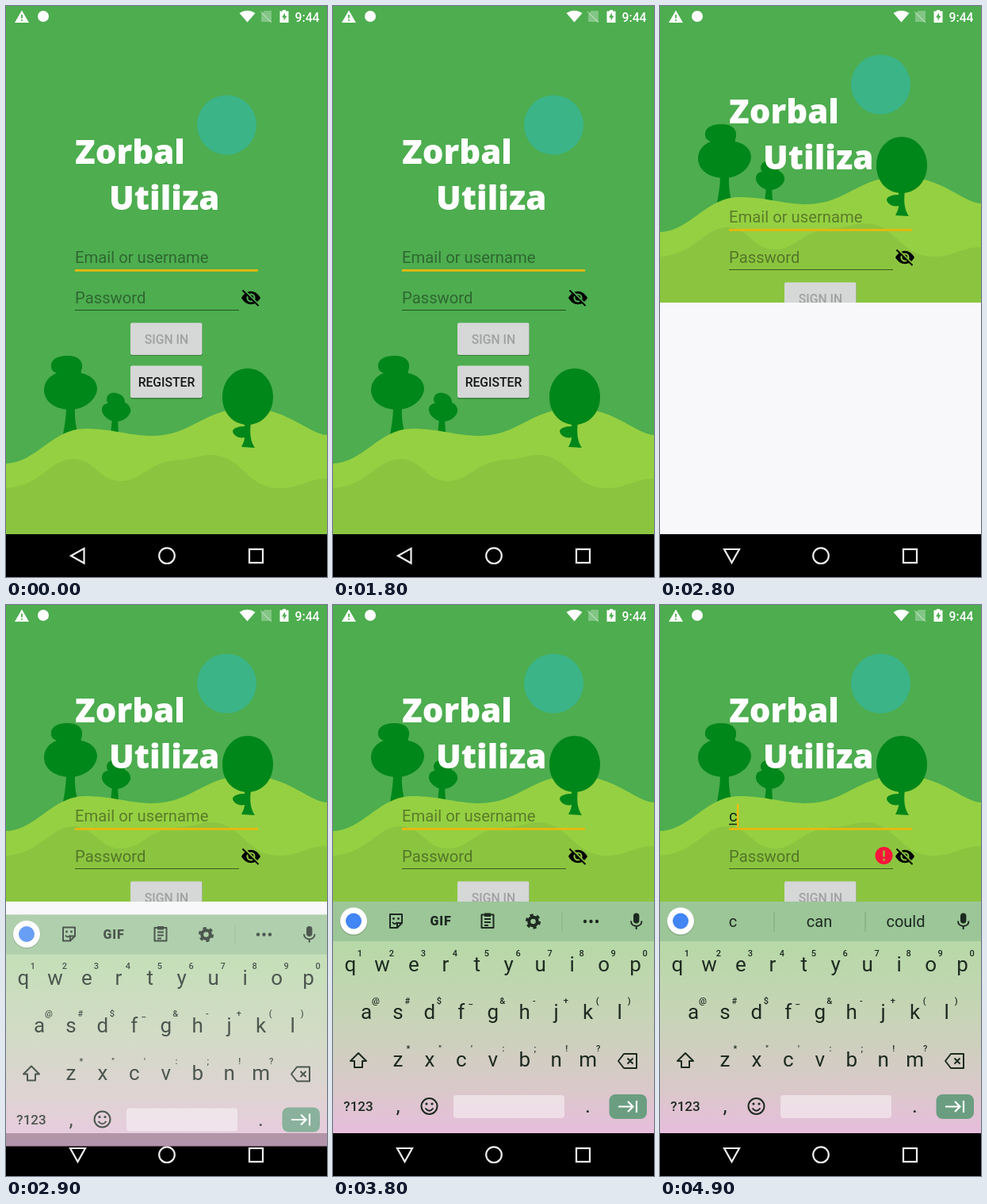
An HTML page that plays this animation: 405x720 px, repeating every 5200 ms.

```html
<!DOCTYPE html>
<html lang="en">
<head>
<meta charset="utf-8">
<title>Sign in</title>
<style>
  html, body { margin: 0; width: 100%; height: 100%; overflow: hidden; background: #000; }
  svg { display: block; width: 100%; height: 100%; }
  text { font-family: Roboto, sans-serif; white-space: pre; }
  .mid { text-anchor: middle; }
  .title { font: 800 42px "Open Sans", sans-serif; fill: #fff; }
  .field { font-size: 20.25px; }
  .hint { fill: rgba(0, 0, 0, .4); }
  .button { font-size: 15.75px; font-weight: 500; }
  .key { font-size: 26px; }
  .symbol { font-size: 11px; font-weight: 500; }
  .word { font-size: 20px; }
  .line { fill: none; stroke: #1d2a20; stroke-width: 2; stroke-linejoin: round; }
  .nav { fill: none; stroke: #eee; stroke-width: 2.2; }
</style>
</head>
<body>
<svg viewBox="0 0 405 720">
  <defs>
    <linearGradient id="keys" x1="0" y1="0" x2="0" y2="1">
      <stop offset="0" stop-color="#aedb9e"/>
      <stop offset=".5" stop-color="#c7d4b7"/>
      <stop offset=".8" stop-color="#d9c9c9"/>
      <stop offset="1" stop-color="#e7bddc"/>
    </linearGradient>
    <mask id="eyeCuts">
      <path fill="#fff" d="M290 350H330V390H290Z"/>
      <circle cx="309" cy="368" r="4.5" fill="none" stroke="#000" stroke-width="2.2"/>
      <path d="M299 356.5L322 379.5" stroke="#000" stroke-width="2.2"/>
    </mask>
  </defs>

  <rect width="405" height="720" fill="#4dad4f"/>

  <g id="scenery">
    <g fill="#008719">
      <path d="M57 455C56 443 70 441 78 441C90 441 97 447 96 455C96 459 94 461 95 463C106 465 115 472 115 483C114 497 98 509 81 509C64 509 48 500 48 484C48 474 55 466 64 463C59 461 57 458 57 455Z"/>
      <path d="M76 505H87Q86 525 91 540H72Q76 520 76 505Z"/>
      <path d="M127 495C128 488 135 487 139 488C146 490 150 493 150 500C155 502 158 507 157 512C154 520 146 524 139 524C130 524 120 516 121 508C122 503 125 501 129 501C127 499 127 497 127 495Z"/>
      <path d="M134 520H141L142 540H132Z"/>
    </g>
    <path fill="#95d042" d="M0 577C38 576 58 533 100 533C135 533 155 542 185 542C235 542 250 507 305 507C355 507 382 540 405 541V666H0Z"/>
    <path fill="#8bc540" d="M0 608C45 605 55 571 85 571C112 571 117 599 145 599C172 599 180 573 220 572C235 572 245 566 258 566C298 566 303 608 345 608C370 608 380 596 405 596V666H0Z"/>
    <g fill="#008719">
      <path d="M305 457C323 457 337 473 337 493C337 514 322 528 305 528C287 528 273 514 273 493C273 473 287 457 305 457Z"/>
      <path d="M301 525H309C307 540 309 550 314 557L297 556C299 552 301 548 301 544C294 546 286 541 286 536C287 531 296 530 301 530Z"/>
    </g>
  </g>

  <g id="form">
    <circle cx="278.5" cy="150" r="37.5" fill="#3bb488"/>
    <text class="title" x="87" y="199">Zorbal</text>
    <text class="title" x="130" y="257">Utiliza</text>

    <text id="emailHint" class="field hint" x="87" y="324">Email or username</text>
    <g id="typed">
      <text class="field" x="87" y="324" fill="#1c2a12">c</text>
      <path d="M87 327.5H97" stroke="#1c2a12" stroke-width="1.5"/>
      <circle cx="282.5" cy="367" r="11" fill="#f9143a"/>
      <path d="M282.5 360.5V368.5M282.5 371V373.5" stroke="#93b73e" stroke-width="2.6"/>
    </g>
    <rect id="cursor" y="302" width="2.2" height="29" fill="#f9b90a"/>
    <rect x="87" y="332" width="231" height="2.8" fill="#e8b80e"/>

    <text class="field hint" x="87" y="375">Password</text>
    <path d="M87 383.5H294" stroke="#000" stroke-opacity=".54"/>
    <path mask="url(#eyeCuts)" d="M297 368C303 357 315 357 321 368C315 379 303 379 297 368Z"/>
    <path d="M298.5 358.5L318.5 378" stroke="#000" stroke-width="1.9"/>

    <g fill="#000" fill-opacity=".25">
      <rect x="157" y="400.5" width="91" height="40.5" rx="2"/>
      <rect x="157" y="455" width="91" height="40.5" rx="2"/>
    </g>
    <g fill="#d6d7d7">
      <rect x="157" y="399.5" width="90.5" height="40.5" rx="2"/>
      <rect x="157" y="453.5" width="90.5" height="40.5" rx="2"/>
    </g>
    <text class="button mid" x="202.5" y="426" fill="#a0a1a1">SIGN IN</text>
    <text class="button mid" x="202.5" y="480" fill="#161616">REGISTER</text>
  </g>

  <rect id="blank" y="374" width="405" height="292" fill="#f8f8fa"/>

  <g fill="#fff">
    <path d="M20 5.5L29 21H11Z"/>
    <path d="M20 11V15.5M20 17V18.8" stroke="#4dad4f" stroke-width="1.8"/>
    <circle cx="47" cy="13" r="7"/>
    <path d="M294.5 9Q304.5 2.5 314.5 9L304.5 20.5Z"/>
    <path fill-opacity=".3" d="M326 6H335V20H322V10Z"/>
    <path d="M321 7L335 21" stroke="#fff" stroke-opacity=".4" stroke-width="1.3"/>
    <path d="M349 5H353V6.5H356.5V21H345.5V6.5H349Z"/>
    <path fill="#4dad4f" d="M352 8.5L348 14.5H350.5V18.5L354.5 12.5H352Z"/>
    <text x="364.5" y="19.5" font-size="15.75" font-weight="500">9:44</text>
  </g>

  <rect y="666" width="405" height="54"/>
  <g class="nav">
    <path id="back"/>
    <circle cx="203" cy="693.2" r="9.8"/>
    <rect x="307" y="685" width="17" height="17"/>
  </g>

  <g id="keyboard" fill="#1d2a20">
    <rect y="374" width="405" height="292" fill="url(#keys)"/>
    <rect y="374" width="405" height="50" fill="#9cc698"/>
    <circle cx="26" cy="399.5" r="17.5" fill="#000" fill-opacity=".15"/>
    <circle cx="26" cy="398.5" r="17" fill="#fff"/>
    <circle cx="26" cy="398.5" r="10" fill="#4285f4"/>

    <g id="tools">
      <path class="line" d="M72 390H87V401L81 407H72ZM87 401H81V407M75 400Q78 404 81 400"/>
      <circle cx="76.5" cy="395.5" r="1.4"/><circle cx="82.5" cy="395.5" r="1.4"/>
      <text class="mid" x="136" y="404" font-size="16" font-weight="900" letter-spacing=".8">GIF</text>
      <path class="line" d="M187.5 390.5H202.5V407H187.5ZM191 396H199M191 400H199M191 404H196"/>
      <path d="M191 388.5H199V393H191Z"/>
      <circle class="line" cx="252.5" cy="399" r="5.3" style="stroke-width:4"/>
      <circle class="line" cx="252.5" cy="399" r="8.2" style="stroke-width:2.8" stroke-dasharray="4.3 4.287"/>
      <path d="M289 387V411" stroke="#1d2a20" stroke-opacity=".13"/>
      <circle cx="318" cy="399" r="2.2"/><circle cx="325.5" cy="399" r="2.2"/><circle cx="333" cy="399" r="2.2"/>
    </g>
    <g id="suggestions">
      <path d="M144 387V412M259 387V412" stroke="#1d2a20" stroke-opacity=".22"/>
      <text class="word mid" x="92" y="406">c</text>
      <text class="word mid" x="201" y="406">can</text>
      <text class="word mid" x="310" y="406">could</text>
    </g>
    <rect x="379" y="388.5" width="7.4" height="13" rx="3.7"/>
    <path class="line" d="M376 398.5C376 407 389.5 407 389.5 398.5M382.7 405V409"/>

    <g id="letters"></g>

    <path class="line" d="M32 565L42 575H37V583H27V575H22Z"/>
    <path class="line" d="M360 575L367 566H383V584H367ZM371.5 571.5L378.5 578.5M378.5 571.5L371.5 578.5"/>
    <text class="mid" x="32" y="638" font-size="17" font-weight="500">?123</text>
    <text class="key mid" x="82" y="640">,</text>
    <circle class="line" cx="121.5" cy="632" r="10"/>
    <path class="line" d="M116.5 634.5Q121.5 641 126.5 634.5"/>
    <circle cx="118" cy="629" r="1.6"/><circle cx="125" cy="629" r="1.6"/>
    <rect x="152" y="618" width="140" height="29" rx="4" fill="#fff" fill-opacity=".45"/>
    <text class="key mid" x="321.5" y="640">.</text>
    <rect x="348.5" y="617" width="47.5" height="31" rx="8" fill="#6b9e81"/>
    <path d="M360 632.5H378M372 626L378.5 632.5L372 639M383 625V640" fill="none" stroke="#fff" stroke-width="2.2"/>
  </g>
</svg>

<script>
const LOOP = 5200, KEYBOARD_AT = 2800, TYPED_AT = 4700, SUGGEST_AT = 4800;
const el = id => document.getElementById(id);
const show = (id, on) => el(id).setAttribute('visibility', on ? 'visible' : 'hidden');
const shift = (id, y) => el(id).setAttribute('transform', `translate(0 ${y})`);

function addText(className, x, y, content) {
  const node = document.createElementNS('http://www.w3.org/2000/svg', 'text');
  node.setAttribute('class', className + ' mid');
  node.setAttribute('x', x);
  node.setAttribute('y', y);
  node.textContent = content;
  el('letters').append(node);
}

function addRow(letters, symbols, firstX, baseline, symbolShift) {
  [...letters].forEach((letter, i) => {
    const x = firstX + i * 39.95;
    addText('key', x, baseline, letter);
    addText('symbol', x + symbolShift, baseline - 19.5, symbols[i]);
  });
}
addRow('qwertyuiop', '1234567890', 22, 462, 12);
addRow('asdfghjkl', '@#$_&-+()', 42, 522, 12);
addRow('zxcvbnm', '*"\':;!?', 82, 582, 13);

function cursorVisible(t) {
  if (t >= TYPED_AT) return true;
  const phase = t < KEYBOARD_AT ? t + 200 : t - KEYBOARD_AT;
  const tapped = t >= 2700 && t < KEYBOARD_AT;
  return !tapped && Math.floor(phase / 500) % 2 === 1;
}

function draw(t) {
  const open = t >= KEYBOARD_AT, typed = t >= TYPED_AT, suggesting = t >= SUGGEST_AT;
  shift('scenery', open ? -292 : 0);
  shift('form', open ? -51 : 0);
  show('blank', open);
  el('back').setAttribute('d', open ? 'M81 685H100L90.5 702Z' : 'M82 693.2L98.5 684V702.5Z');

  // The keyboard slides up and fades in, in steps of 100 ms.
  const step = Math.floor((t - KEYBOARD_AT) / 100);
  const left = Math.max(0, 1 - (step - 1) / 2) ** 2;
  show('keyboard', step >= 1);
  shift('keyboard', 16.5 * left);
  el('keyboard').setAttribute('opacity', 1 - .22 * left);
  show('tools', step >= 1 && !suggesting);
  show('suggestions', suggesting);

  show('emailHint', !typed);
  show('typed', typed);
  show('cursor', cursorVisible(t));
  el('cursor').setAttribute('x', typed ? 97 : 87);
}

const start = performance.now();
function tick() {
  draw((performance.now() - start) % LOOP);
  requestAnimationFrame(tick);
}
tick();
</script>
</body>
</html>
```
